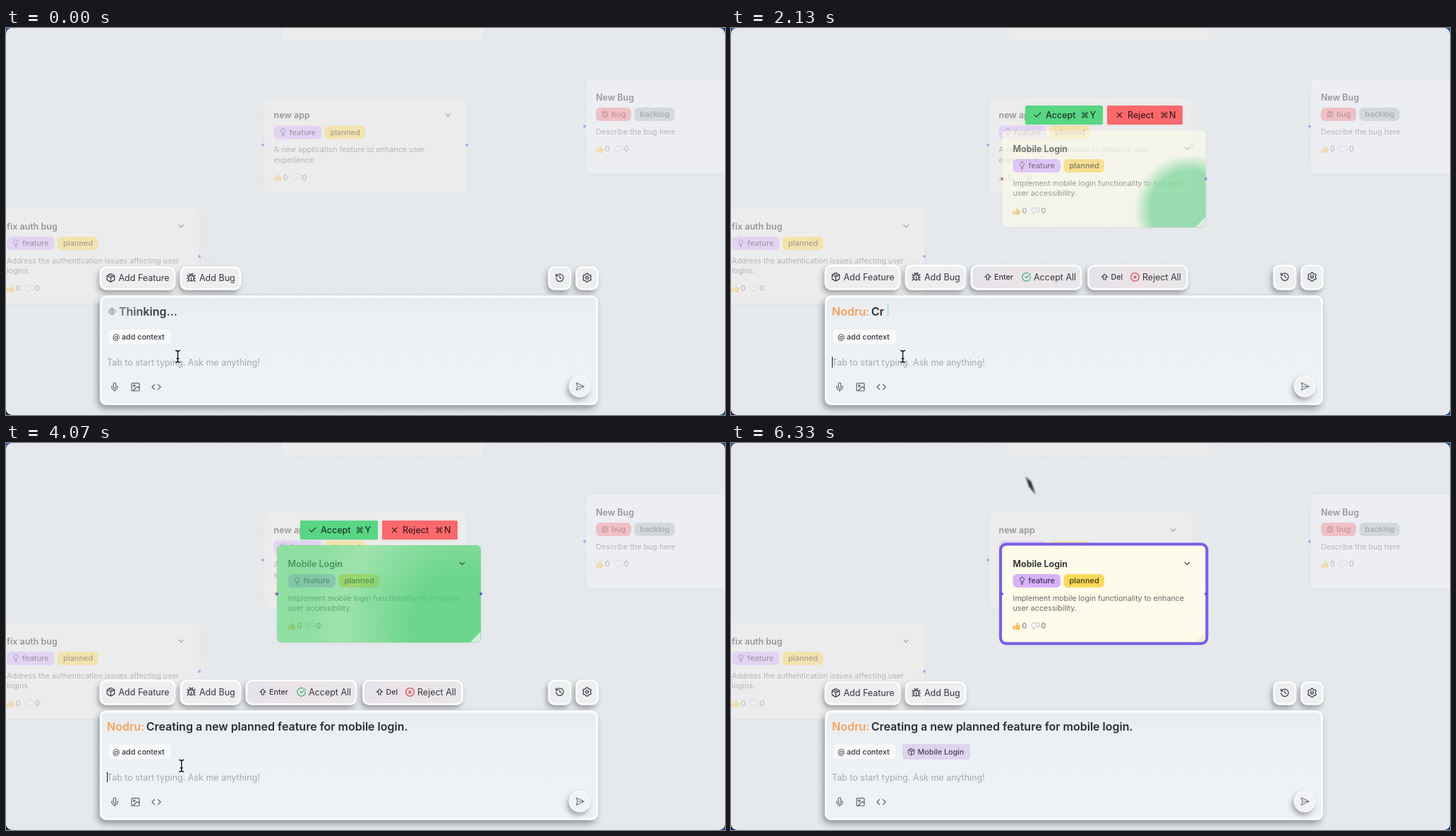
These frames come from a looping animation (1019x549 px, 6390 ms). An HTML page:

```html
<!DOCTYPE html>
<html lang="en">
<head>
<meta charset="utf-8">
<title>Roadmap assistant</title>
<style>
  html, body { margin: 0; width: 100%; height: 100%; overflow: hidden; background: #164a94; }
  svg { display: block; width: 100vw; height: 100vh; font-family: Inter, sans-serif; }
  text { white-space: pre; }
</style>
</head>
<body>
<svg id="stage" viewBox="0 0 1019 549" xmlns="http://www.w3.org/2000/svg"></svg>
<script>
const LOOP = 6390, REPLY = 2060, ACCEPT = 5400, CHAR_MS = 30;
const MESSAGE = "Creating a new planned feature for mobile login.";
const BASE = 12.5, SMALL = 10.72, LARGE = 16;

// Outline icons on a 24-unit grid
const gear = "M" + Array.from({ length: 72 }, (_, i) => {
  const a = i * Math.PI / 36, r = 8.8 + 1.1 * Math.tanh(2 * Math.cos(6 * a));
  return (12 + r * Math.sin(a)).toFixed(2) + " " + (12 - r * Math.cos(a)).toFixed(2);
}).join("L") + "Z";
const ICONS = {
  box: "M11 21.7a2 2 0 0 0 2 0l7-4A2 2 0 0 0 21 16V8a2 2 0 0 0-1-1.7l-7-4a2 2 0 0 0-2 0l-7 4A2 2 0 0 0 3 8v8a2 2 0 0 0 1 1.7zM3.3 7l8.7 5 8.7-5M12 22V12M7.5 4.3l9 5.1",
  bug: "M12 20a6 6 0 0 1-6-6v-3a4 4 0 0 1 4-4h4a4 4 0 0 1 4 4v3a6 6 0 0 1-6 6zV11M8 2l2 2M14 4l2-2M9 7V6a3 3 0 0 1 6 0v1M6 13H2M22 13h-4M3 21c0-2 2-4 4-4M21 21c0-2-2-4-4-4M3 5c0 2 2 4 4 4M21 5c0 2-2 4-4 4",
  history: "M3 12a9 9 0 1 0 9-9 9.75 9.75 0 0 0-6.7 2.7L3 8M3 3v5h5M12 7v5l4 2",
  gear: gear + "M9 12a3 3 0 1 0 6 0 3 3 0 1 0-6 0",
  mic: "M12 2a3 3 0 0 0-3 3v7a3 3 0 0 0 6 0V5a3 3 0 0 0-3-3zM19 10v2a7 7 0 0 1-14 0v-2M12 19v3",
  image: "M5 3h14a2 2 0 0 1 2 2v14a2 2 0 0 1-2 2H5a2 2 0 0 1-2-2V5a2 2 0 0 1 2-2zM7 9a2 2 0 1 0 4 0 2 2 0 1 0-4 0M21 15l-3-3a2 2 0 0 0-3 0l-9 9",
  code: "M16 18l6-6-6-6M8 6l-6 6 6 6",
  send: "M3 3l3 9-3 9 19-9zM6 12h16",
  bulb: "M15 14c.2-1 .7-1.7 1.5-2.5A6 6 0 1 0 6 8c0 1 .2 2.2 1.5 3.5.7.7 1.3 1.5 1.5 2.5zM9 18h6M10 22h4",
  chevron: "M6 9l6 6 6-6",
  check: "M20 6L9 17l-5-5",
  cross: "M18 6L6 18M6 6l12 12",
  checkCircle: "M21.8 10A10 10 0 1 1 17 3.3M9 11l3 3L22 4",
  crossCircle: "M2 12a10 10 0 1 0 20 0 10 10 0 1 0-20 0M15 9l-6 6M9 9l6 6",
  shift: "M9 19v-7H4l8-8 8 8h-5v7z",
  command: "M15 6v12a3 3 0 1 0 3-3H6a3 3 0 1 0 3 3V6a3 3 0 1 0-3 3h12a3 3 0 1 0-3-3",
  brain: "M12 2a10 10 0 1 0 0 20 10 10 0 1 0 0-20zM12 2v20M7 8c3 0 3 3 1 4s-1 4 1 4M17 8c-3 0-3 3-1 4s1 4-1 4"
};
const BEAM = "M-3.5-8.5Q0-8.5 0-6V6Q0 8.5-3.5 8.5M3.5-8.5Q0-8.5 0-6V6Q0 8.5 3.5 8.5M-2 3H2";

const icon = (name, cx, cy, size, color, width = 2, attrs = "") =>
  `<path d="${ICONS[name]}" transform="translate(${cx - size / 2} ${cy - size / 2}) scale(${size / 24})"
    fill="none" stroke="${color}" stroke-width="${width}" stroke-linecap="round" stroke-linejoin="round" ${attrs}/>`;
const text = (x, cy, label, size, weight, color, attrs = "") =>
  `<text x="${x}" y="${cy + size * .36}" font-size="${size}" font-weight="${weight}" fill="${color}" ${attrs}>${label}</text>`;
const rect = (x, y, w, h, r, fill, attrs = "") =>
  `<rect x="${x}" y="${y}" width="${w}" height="${h}" rx="${r}" fill="${fill}" ${attrs}/>`;
const dot = (x, y, fill = "#6258e0", r = 2) => `<circle cx="${x}" cy="${y}" r="${r}" fill="${fill}"/>`;

const CHIPS = {
  feature: { w: 67.5, fill: "#d7b2fb", icon: "bulb", ink: "#41305a" },
  bug: { w: 50, fill: "#f58288", icon: "bug", ink: "#7a1f25" },
  planned: { w: 57.5, fill: "#fbd95b", ink: "#453a14" },
  backlog: { w: 57, fill: "#b4b8bd", ink: "#42464c" }
};
function chip(kind, x, cy) {
  const c = CHIPS[kind];
  return rect(x, cy - 9.5, c.w, 19, 6, c.fill) +
    (c.icon ? icon(c.icon, x + 13, cy, 11.5, c.ink) : "") +
    text(x + (c.icon ? 22 : 8), cy, kind, 11, 500, c.ink);
}

// Card contents, placed from the title's left edge and middle line
function cardContent(x, y, { title, chips, lines, chevron }) {
  const low = y + 73.5 + 14.8 * (lines.length - 1);
  return text(x, y, title, BASE, 600, "#262728") +
    chip(chips[0], x, y + 24.5) + chip(chips[1], x + CHIPS[chips[0]].w + 4.5, y + 24.5) +
    lines.map((line, i) => text(x, y + 49 + 14.6 * i, line, SMALL, 400, "#68696b")).join("") +
    `<path transform="translate(${x} ${low - 5})" fill="#f6c35c" d="M0 5h3v5.5H0zM3.6 5L6 0c1.6 0 1.6 1.6 1 4h3.4c.6 2.6 0 5-1 6.6H5L3.6 10z"/>` +
    text(x + 13, low, "0", SMALL, 400, "#68696b") +
    `<path transform="translate(${x + 27} ${low - 5})" fill="#fff" stroke="#a5a9ae" stroke-width=".8" d="M3 1h5a3 3 0 0 1 0 6H5L2 10V7a3 3 0 0 1 1-6zM3 4h5"/>` +
    text(x + 40, low, "0", SMALL, 400, "#68696b") +
    (chevron ? icon("chevron", x + 247, y, 13, "#262728") : "");
}
function dimCard(x, y, w, h, fill, content) {
  return rect(x, y, w, h, 8, fill, 'opacity=".5" filter="url(#cardShadow)"') +
    `<g opacity=".42">${content}</g>`;
}
const button = (x, y, w, h, fill = "#eceef0") =>
  rect(x, y, w, h, 8.5, fill, 'stroke="#fcfdfd" stroke-width="2.6" filter="url(#lift)"');

const loginCard = {
  title: "Mobile Login", chips: ["feature", "planned"],
  lines: ["Implement mobile login functionality to enhance", "user accessibility."]
};

const defs = `<defs>
  <pattern id="dots" x="5" y="7" width="14.18" height="14.18" patternUnits="userSpaceOnUse">${dot(7, 7, "#d3d7db", .7)}</pattern>
  <filter id="lift" x="-40%" y="-50%" width="180%" height="220%"><feDropShadow dx="-2.5" dy="4.5" stdDeviation="3.6" flood-color="#35393e" flood-opacity=".42"/></filter>
  <filter id="panelLift" x="-5%" y="-20%" width="110%" height="140%"><feDropShadow dx="-3" dy="5" stdDeviation="5" flood-color="#35393e" flood-opacity=".48"/></filter>
  <filter id="cardShadow"><feDropShadow dx="0" dy="1" stdDeviation="2" flood-opacity=".07"/></filter>
  <filter id="smear" x="-50%" y="-50%" width="200%" height="200%"><feGaussianBlur stdDeviation=".9"/></filter>
  <linearGradient id="panelFill" x2="0" y2="1"><stop stop-color="#e9ecee"/><stop offset=".3" stop-color="#edf1f3"/><stop offset="1" stop-color="#eff2f4"/></linearGradient>
  <linearGradient id="reviewFill"><stop stop-color="#e5e3e8"/><stop offset=".5" stop-color="#ebe4e8"/><stop offset="1" stop-color="#e7e7ea"/></linearGradient>
  <linearGradient id="shimmer" gradientUnits="userSpaceOnUse"><stop stop-color="#7d8083"/><stop offset=".4" stop-color="#38393b"/><stop offset=".75" stop-color="#38393b"/><stop offset="1" stop-color="#7d8083"/></linearGradient>
  <radialGradient id="washFill" gradientUnits="userSpaceOnUse" cx="650" cy="258">
    <stop stop-color="#56d07d" stop-opacity=".86"/><stop id="core" stop-color="#56d07d" stop-opacity=".86"/>
    <stop id="ring" stop-color="#56d07d"/><stop id="rim" offset="1" stop-color="#56d07d"/>
  </radialGradient>
</defs>`;

const board =
  rect(0, 0, 60, 60, 0, "#3c4f97") + rect(0, 500, 60, 49, 0, "#18224c") +
  rect(0, 0, 1019, 549, 8.5, "#e6e9ec") + rect(0, 0, 1019, 549, 8.5, "url(#dots)") +
  dimCard(391, -118, 286.5, 136, "#f2f0ed", "") +
  dimCard(366, 98, 287, 136, "#f2f0ed", cardContent(379.5, 123.5, {
    title: "new app", chips: ["feature", "planned"], chevron: true,
    lines: ["A new application feature to enhance user", "experience."]
  }) + dot(364, 166) + dot(653, 166)) +
  dimCard(-13, 255, 287, 136, "#f2f0ed", cardContent(1, 281, {
    title: "fix auth bug", chips: ["feature", "planned"], chevron: true,
    lines: ["Address the authentication issues affecting user", "logins."]
  }) + dot(274, 324)) +
  dimCard(822, 73, 287, 133.5, "#f2f3f8", cardContent(836, 98, {
    title: "New Bug", chips: ["bug", "backlog"], lines: ["Describe the bug here"]
  }) + dot(820, 139.5));

const newCard = `<g id="card">
  ${rect(384.5, 145.5, 288, 137, 6, "#fdfbe9", 'filter="url(#cardShadow)"')}
  ${cardContent(399.5, 171, loginCard)}
  ${rect(384, 145, 289, 138, 6, "url(#washFill)", 'id="wash"')}
  <path id="fold" d="M658 282.5L672.5 268V277a5.5 5.5 0 0 1-5.5 5.5z"/>
  ${icon("chevron", 646.5, 171, 13, "#262728", 2, 'id="cardChevron"')}
  ${rect(382, 143.5, 292.5, 141, 8, "none", 'id="selection" stroke="#765ee6" stroke-width="4"')}
  ${dot(384, 214) + dot(673, 214)}
</g>`;

const verdicts = `<g class="review">
  ${rect(417, 110, 110, 27, 1.5, "#58d684", 'id="accept" filter="url(#cardShadow)"')}
  ${icon("check", 434.5, 123.5, 13, "#1d3a28")}${text(446, 123.5, "Accept", BASE, 500, "#1d3a28")}
  ${icon("command", 501.5, 123.5, 11, "#1d3a28")}${text(508.5, 123.5, "Y", BASE, 500, "#1d3a28")}
  ${rect(533, 110, 107, 27, 1.5, "#fb696c", 'filter="url(#cardShadow)"')}
  ${icon("cross", 550.5, 123.5, 13, "#4c1a1d")}${text(562, 123.5, "Reject", BASE, 500, "#4c1a1d")}
  ${icon("command", 614, 123.5, 11, "#4c1a1d")}${text(621, 123.5, "N", BASE, 500, "#4c1a1d")}
</g>`;

// The toolbar row is slightly taller while changes await review
function toolbar(y, h) {
  const cy = y + h / 2 - .7, ink = "#36383c";
  return button(134, y, 105, h) + icon("box", 148.5, cy, 14, ink) + text(159.5, cy, "Add Feature", BASE, 400, ink) +
    button(248, y, 84, h) + icon("bug", 262.5, cy, 14, ink) + text(274, cy, "Add Bug", BASE, 400, ink) +
    button(769.5, y, 30.5, h) + icon("history", 784.8, cy, 14, ink) +
    button(808.5, y, 30, h) + icon("gear", 823.5, cy, 15, ink);
}
const bulkButton = (x, w, key, mark, color, label, markX) =>
  button(x, 337, w, 33.5, "url(#reviewFill)") + icon("shift", x + 23, 353.3, 12.5, "#36383c") +
  text(x + (key === "Del" ? 18 : 32), 353.3, key, SMALL, 500, "#36383c") +
  icon(mark, markX, 353.3, 14, color) + text(markX + 10.5, 353.3, label, BASE, 400, "#36383c");

const controls = `
  <g id="plainBar">${toolbar(339.5, 31)}</g>
  <g class="review">${toolbar(337, 33.5)}
    ${bulkButton(341, 155, "Enter", "checkCircle", "#3fae74", "Accept All", 418.5)}
    ${bulkButton(506.5, 140, "Del", "crossCircle", "#dc3b46", "Reject All", 572.5).replace('x="524.5"', 'x="538.5"')}
  </g>
  ${rect(134.5, 381, 703, 152.5, 8, "url(#panelFill)", 'stroke="#fcfdfd" stroke-width="3" filter="url(#panelLift)"')}
  <g id="thinking">${icon("brain", 150.3, 402, 10.5, "#75787c")}${text(160, 402, "Thinking...", LARGE, 600, "url(#shimmer)")}</g>
  <g id="reply">${text(143, 402, "Nodru:", LARGE, 600, "#f3a15f")}${text(198.7, 402, "", LARGE, 600, "#2b2c2e", 'id="message"')}
    ${rect(0, 392, 1.8, 17, 0, "#8cc", 'id="typeCaret" opacity=".65"')}</g>
  ${rect(144, 427, 90, 22, 4, "#f8f9fb", 'stroke="#e6e9ec" stroke-width=".8"')}
  ${text(151, 438, "@", SMALL, 400, "#36383c")}${text(164, 438, "add context", SMALL, 500, "#36383c")}
  <g id="contextChip">${rect(243, 427, 96, 22, 4, "#ddd5ee")}${icon("box", 255.5, 438, 11.5, "#45424f")}${text(264.5, 438, "Mobile Login", SMALL, 500, "#45424f")}</g>
  ${text(143, 474.3, "Tab to start typing. Ask me anything!", BASE, 400, "#a5a9ae")}
  ${rect(143, 466.5, 1.1, 15, 0, "#222", 'id="inputCaret"')}
  ${["mic", "image", "code"].map((name, i) => icon(name, 154 + 29.5 * i, 509.3, 14.5, "#5a6068")).join("")}
  <circle cx="813" cy="508.5" r="14.5" fill="#f0f2f4" stroke="#f8fafa" stroke-width="1.5" filter="url(#lift)"/>
  ${icon("send", 813.5, 508.5, 14, "#7b7f84")}`;

const pointers = `<g id="pointer">
  <g id="beam" fill="none"><path d="${BEAM}" stroke="#fff" stroke-width="3.2"/><path d="${BEAM}" stroke="#151515" stroke-width="1.5"/></g>
  <path id="arrow" d="M0 0V16.5L3.8 13L6.4 19L9.2 17.8L6.7 12H12Z" fill="#111" stroke="#fff" stroke-width="1.1"/>
  <path id="streak" d="M0 0L8 7L14 25L5 14Z" fill="#2b2d2f" filter="url(#smear)"/>
</g>`;

document.getElementById("stage").innerHTML = defs + board + newCard + verdicts + controls + pointers;

const $ = id => document.getElementById(id);
const reviewParts = document.querySelectorAll(".review");
const show = (node, on) => node.setAttribute("visibility", on ? "visible" : "hidden");
const set = (id, attrs) => { for (const key in attrs) $(id).setAttribute(key, attrs[key]); };
const mix = (a, b, p) => a + (b - a) * p;
const progress = (t, from, to) => Math.min(1, Math.max(0, (t - from) / (to - from)));
const smooth = p => p * p * (3 - 2 * p);

function drawWash(t) {
  const settle = smooth(progress(t, 2330, 2930));
  const pulse = 185 - 35 * Math.cos(2 * Math.PI * (t - 2930) / 2200);
  set("washFill", { r: mix(200 * progress(t, REPLY - 60, 2330), pulse, settle) });
  set("core", { offset: mix(.7, .35, settle) });
  set("ring", { offset: mix(.99, .8, settle), "stop-opacity": mix(0, .56, settle) });
  set("rim", { "stop-opacity": mix(0, .66, settle) });
  set("cardChevron", { opacity: t < ACCEPT ? mix(.45, .85, settle) : 1 });
}

function drawPointer(t) {
  const approach = smooth(progress(t, 3990, 4880)), leave = progress(t, 6000, 6330) ** 2;
  const x = mix(mix(243.5, 467, approach), 417.5, leave);
  const y = mix(mix(466, 122, approach), 48, leave);
  set("pointer", { transform: `translate(${x} ${y})` });
  show($("beam"), y > 380);
  show($("arrow"), y <= 380 && leave < .3);
  show($("streak"), leave >= .3);
}

function render(t) {
  const replying = t >= REPLY, accepted = t >= ACCEPT, reviewing = replying && !accepted;
  reviewParts.forEach(part => show(part, reviewing));
  show($("plainBar"), !reviewing);
  show($("thinking"), !replying);
  show($("reply"), replying);
  show($("card"), replying);
  show($("wash"), reviewing);
  show($("selection"), accepted);
  show($("contextChip"), accepted);
  show($("inputCaret"), !accepted && (t + 970) % 1000 < 500);
  set("card", { opacity: progress(t, REPLY - 30, REPLY + 130) });
  set("fold", { fill: accepted ? "#f3efcf" : "#d5efd9" });
  set("accept", { fill: t > 4830 ? "#6de596" : "#58d684" });

  const tail = 160 + .27 * (((t + 400) % 1400) - 400);
  set("shimmer", { x1: tail, x2: tail + 105 });

  const typed = Math.max(0, Math.min(MESSAGE.length, Math.floor((t - REPLY) / CHAR_MS)));
  $("message").textContent = MESSAGE.slice(0, typed);
  const typing = replying && typed < MESSAGE.length;
  show($("typeCaret"), typing);
  if (typing) set("typeCaret", {
    x: 203.5 + $("message").getComputedTextLength(),
    fill: `hsl(${mix(170, 212, (t - 2330) / 600)} 50% 70%)`
  });

  drawWash(t);
  drawPointer(t);
}

const start = performance.now();
function tick() {
  render((performance.now() - start) % LOOP);
  requestAnimationFrame(tick);
}
tick();
</script>
</body>
</html>
```
